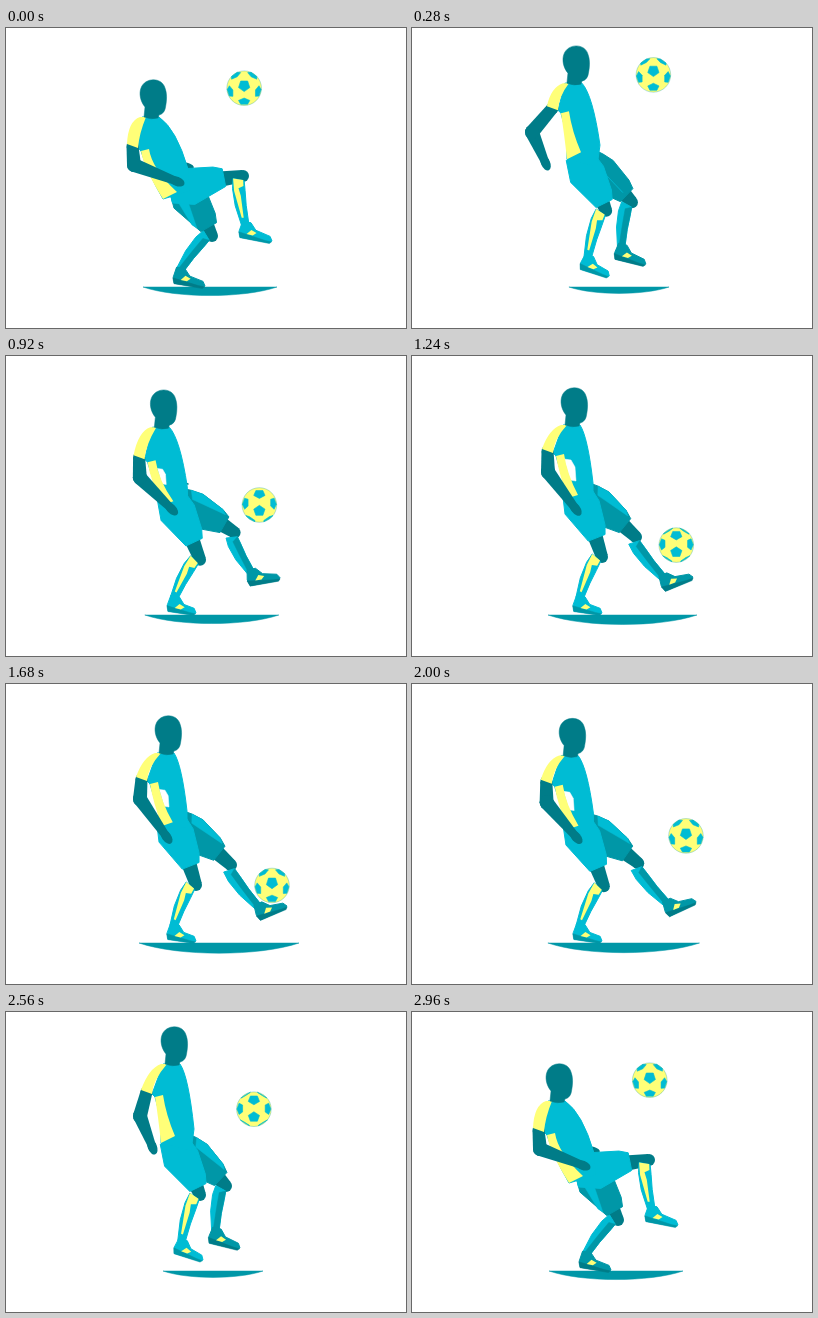
An HTML page with a canvas that plays this animation: 400 by 300 pixels, repeating every 3 s.

```html
<!DOCTYPE html>
<html lang="en">
<head>
<meta charset="utf-8">
<title>Ball juggling</title>
<style>
html, body { margin: 0; width: 100%; height: 100%; overflow: hidden; background: #fff; }
canvas { display: block; }
</style>
</head>
<body>
<canvas id="stage" width="400" height="300"></canvas>
<script>
const ctx = document.getElementById('stage').getContext('2d');
const LOOP = 3000;
const CYAN = '#00bcd4', TEAL = '#0097a7', SKIN = '#007c88', YELLOW = '#ffff78';

// Legs are knee, ankle, toe. "side" picks the lit edge of the far shorts.
const knee = {
  head: [147, 68], sleeve: [132, 120], belly: [182, 141], back: [157, 171],
  elbow: [128, 137], hand: [170, 153], hip: [172, 157],
  near: [237, 148, 239, 197, 266, 213], far: [206, 208, 173, 243, 199, 258],
  shadow: [137, 271], gap: [0], reach: [1], side: [-1]
};
const ready = {
  ...knee, head: [147.5, 67], back: [157, 169], hip: [172, 158],
  near: [205, 211, 168, 243, 190, 257], far: [240, 167, 239, 212, 270, 226],
  shadow: [141, 267], side: [1]
};
const tap = { ...ready, far: [241, 167, 241, 207, 272, 219] };
const low = {
  head: [162, 48], sleeve: [141, 97], belly: [181, 127], back: [156, 142],
  elbow: [136, 116], hand: [163, 152], hip: [169, 138],
  near: [190, 201, 167, 243, 190, 257], far: [224, 181, 251, 222, 281, 221],
  shadow: [136, 285], gap: [1], reach: [0], side: [1]
};
const tall = { ...low, head: [161, 44], far: [224, 180, 246, 220, 275, 223], shadow: [138, 275] };
const trap = {
  ...low, elbow: [134, 115], hand: [160, 152],
  far: [225, 181, 252, 223, 281, 222], shadow: [133, 293], gap: [0.8]
};
const kick = {
  ...ready, head: [147, 69], sleeve: [131, 120], belly: [184, 143], back: [156, 168],
  elbow: [125, 137], hand: [168, 156],
  far: [241, 168, 276, 205, 301, 196], shadow: [136, 299], reach: [0]
};
const swing = { ...kick, far: [242, 166, 280, 202, 305, 192], shadow: [135, 305] };
const leap = {
  head: [168, 31], sleeve: [146, 82], belly: [188, 117], back: [155, 131],
  elbow: [134, 104], hand: [146, 134], hip: [173, 133],
  near: [194, 183, 175, 230, 197, 248], far: [220, 174, 209, 219, 234, 236],
  shadow: [157, 257], gap: [0], reach: [0], side: [1]
};
const hop = { ...leap, head: [164, 34], elbow: [120, 104], hand: [133, 134], side: [0] };

const poses = [
  [0, knee], [40, knee], [290, hop], [540, ready], [660, ready], [770, tap],
  [1000, tall], [1240, low], [1470, low], [1680, trap], [1930, low],
  [2235, swing], [2290, kick], [2560, leap], [2880, knee], [3000, knee]
];

// Time, x, y and tilt of the ball at each contact and peak.
const flight = [
  [-225, 236, 125, 0.15], [190, 240, 43, 0.15], [770, 249, 204, 0.8], [1010, 256, 140, 0.7],
  [1260, 265, 198, 0.65], [1470, 266, 165, 0.4], [1690, 266, 205, 0.15], [1930, 272, 150, 0.15],
  [2250, 281, 190, 0.1], [2540, 249, 97, 0.65], [2775, 236, 125, 0.15], [3190, 240, 43, 0.15]
];

const mix = (a, b, k) => a + (b - a) * k;
const add = (p, x, y) => [p[0] + x, p[1] + y];

function span(keys, t) {
  let i = 0;
  while (i < keys.length - 2 && t >= keys[i + 1][0]) i++;
  const a = keys[i], b = keys[i + 1];
  return [a, b, (t - a[0]) / (b[0] - a[0])];
}

function poseAt(t) {
  const [a, b, k] = span(poses, t);
  const e = (1 - Math.cos(Math.PI * k)) / 2;
  const out = {};
  for (const part in a[1]) out[part] = a[1][part].map((v, i) => mix(v, b[1][part][i], e));
  return out;
}

function ballAt(t) {
  const [a, b, k] = span(flight, t);
  const e = b[2] < a[2] ? k * (2 - k) : k * k;
  return [mix(a[1], b[1], k), mix(a[2], b[2], e), mix(a[3], b[3], k)];
}

// Local axes: u runs from a to b, v lies to its side.
function axes(a, b) {
  const len = Math.hypot(b[0] - a[0], b[1] - a[1]) || 1;
  const x = (b[0] - a[0]) / len, y = (b[1] - a[1]) / len;
  const at = (u, v) => [a[0] + x * u - y * v, a[1] + y * u + x * v];
  return { len, at, map: list => list.map(p => at(...p)) };
}

function paint(path, color, line = 1) {
  ctx.fillStyle = ctx.strokeStyle = color;
  ctx.lineWidth = line;
  ctx.lineJoin = 'round';
  ctx.fill(path);
  if (line) ctx.stroke(path);
}

function poly(points, color, line) {
  const path = new Path2D();
  points.forEach(p => path.lineTo(...p));
  path.closePath();
  paint(path, color, line);
}

function oval(c, rx, ry, color, turn = 0) {
  const path = new Path2D();
  path.ellipse(c[0], c[1], rx, ry, turn, 0, Math.PI * 2);
  paint(path, color, 0);
}

function limb(a, b, ra, rb, color) {
  const f = axes(a, b);
  poly(f.map([[0, ra], [f.len, rb], [f.len, -rb], [0, -ra]]), color, 0);
  oval(a, ra, ra, color);
  oval(b, rb, rb, color);
}

function leg(hip, joints, isNear, side) {
  const k = joints.slice(0, 2), ankle = joints.slice(2, 4), toe = joints.slice(4);
  const thigh = axes(hip, k), shin = axes(k, ankle), foot = axes(ankle, toe);
  const s = shin.len, f = foot.len;

  limb(thigh.at(38, 0), k, 8, 6, SKIN);
  poly(shin.map([[2, 10], [s * 0.25, 11], [s * 0.6, 9], [s, 3.5], [s, -4], [s * 0.6, -2], [s * 0.3, -1.5], [5, -1]]), CYAN);
  if (isNear) poly(shin.map([[2, 10], [s * 0.3, 9.5], [s * 0.85, 3], [s * 0.85, 1], [s * 0.4, 3], [12, 5], [10, 0], [4, 0]]), YELLOW, 0);
  else poly(shin.map([[5, -1], [s * 0.3, -1.5], [s * 0.6, -2], [s, -4], [s, 2], [s * 0.5, 4], [8, 5]]), TEAL, 0.5);

  poly(foot.map([[-4, -2], [-2, 8], [2, 13], [f - 2, 3], [f, 0], [f - 4, -3], [12, -1], [4, -5]]), isNear ? CYAN : TEAL);
  poly(foot.map([[-2, 9], [2, 13.5], [f - 1, 3.5], [f, 1], [f - 6, 3]]), isNear ? TEAL : SKIN, 0.5);
  poly(foot.map([[8, 1], [14, 1], [12, 5], [6, 7]]), YELLOW, 0);

  poly(thigh.map([[-8, 17], [14, 21.5], [47, 8], [46, -10], [37, -13], [12, -15], [0, -12], [-10, -8]]), isNear ? CYAN : TEAL);
  if (!isNear) poly(thigh.map([[0, -12 * side], [12, -15 * side], [37, -13 * side], [42, -10 * side], [6, -5 * side]]), CYAN, 0.5);
}

function torso(p) {
  const nape = add(p.head, -11, 21), throat = add(p.head, 6, 21);
  const chest = add(throat, (p.belly[0] - throat[0]) * 0.6, 12);
  const pit = add(p.sleeve, 3, 3), cuff = add(p.sleeve, -11, -4);
  const shirt = new Path2D();
  shirt.moveTo(...nape);
  shirt.lineTo(...throat);
  shirt.quadraticCurveTo(...chest, ...p.belly);
  shirt.lineTo(...add(p.hip, 12, 6));
  shirt.lineTo(...p.back);
  shirt.quadraticCurveTo(...add(pit, 7, 22), ...pit);
  shirt.lineTo(...p.sleeve);
  shirt.closePath();
  paint(shirt, CYAN);

  const g = p.gap[0];
  if (g > 0.05) {
    const c = add(pit, 15, 15);
    const hole = [[-7, -12], [0, -11], [4, -4], [5, 10], [-1, 9]];
    poly(hole.map(([x, y]) => add(c, x * g, y * g)), '#fff', 0.5);
  }

  const panel = new Path2D();
  const end = add(p.back, mix(14, 10, g), mix(-7, -3, g));
  panel.moveTo(...pit);
  panel.lineTo(...add(pit, 8, -2));
  panel.quadraticCurveTo(...add(pit, 11, 18), ...end);
  panel.lineTo(...p.back);
  panel.quadraticCurveTo(...add(pit, 3, 18), ...pit);
  paint(panel, YELLOW, 0);

  const arm = [(cuff[0] + p.sleeve[0]) / 2, (cuff[1] + p.sleeve[1]) / 2];
  limb(arm, p.elbow, 6, 7, SKIN);
  limb(p.elbow, p.hand, 7, 4, SKIN);
  const wrist = axes(p.elbow, p.hand);
  const turn = Math.atan2(p.hand[1] - p.elbow[1], p.hand[0] - p.elbow[0]);
  oval(wrist.at(wrist.len + 1, 0), 8, 4.6, SKIN, turn);

  const stripe = new Path2D();
  stripe.moveTo(...add(nape, 4, 0));
  stripe.lineTo(...add(nape, -2, 0));
  stripe.quadraticCurveTo(...add(nape, -14, 4), ...cuff);
  stripe.lineTo(...p.sleeve);
  stripe.quadraticCurveTo(...add(p.sleeve, 1, -14), ...add(nape, 4, 0));
  paint(stripe, YELLOW, 0);
}

function head([x, y]) {
  ctx.save();
  ctx.translate(x, y);
  paint(new Path2D('M-9 21L-8 11C-13 5-14-3-12-8C-8-19 9-19 12-8C14-3 14 4 12.5 11C12 15 10 18 6 19L5 22Q-2 24-9 21Z'), SKIN, 0.5);
  ctx.restore();
}

// One pentagon patch on the sphere, given by its polar angle and azimuth.
function patch(polar, around, tilt, radius) {
  const sp = Math.sin(polar), cp = Math.cos(polar);
  const sa = Math.sin(around), ca = Math.cos(around);
  const st = Math.sin(tilt), ct = Math.cos(tilt);
  if (sp * sa * st + cp * ct < -0.15) return;
  const size = 0.35;
  const corners = [0, 1, 2, 3, 4].map(i => {
    const a = i * Math.PI * 0.4;
    const u = Math.cos(a) * Math.sin(size), v = Math.sin(a) * Math.sin(size), w = Math.cos(size);
    const x = sp * ca * w - cp * ca * u - sa * v;
    const y = sp * sa * w - cp * sa * u + ca * v;
    const z = cp * w + sp * u;
    return [x * radius, (y * ct - z * st) * radius];
  });
  poly(corners, CYAN, 0.6);
}

function ball([x, y, tilt]) {
  const radius = 17.3;
  ctx.save();
  ctx.translate(x, y);
  oval([0, 0], radius, radius, YELLOW);
  patch(0, -Math.PI / 2, tilt, radius);
  for (let i = 0; i < 5; i++) {
    const a = Math.PI / 2 + i * Math.PI * 0.4;
    patch(1.107, a, tilt, radius);
    patch(2.034, a + Math.PI / 5, tilt, radius);
  }
  ctx.strokeStyle = 'rgba(0,151,167,.5)';
  ctx.lineWidth = 0.6;
  ctx.beginPath();
  ctx.arc(0, 0, radius, 0, Math.PI * 2);
  ctx.stroke();
  ctx.restore();
}

function shadow([l, r]) {
  const w = r - l, y = 259 + w * 0.085;
  const path = new Path2D();
  path.moveTo(l, 259);
  path.bezierCurveTo(l + w * 0.25, y, r - w * 0.25, y, r, 259);
  path.closePath();
  paint(path, TEAL, 0.5);
}

function draw(t) {
  const p = poseAt(t);
  ctx.fillStyle = '#fff';
  ctx.fillRect(0, 0, 400, 300);
  shadow(p.shadow);
  if (p.reach[0] > 0.05) oval(add(p.belly, 0, -3), 6 * p.reach[0], 3 * p.reach[0], SKIN, 0.3);
  leg(add(p.hip, 9, 1), p.far, false, p.side[0]);
  leg(p.hip, p.near, true);
  torso(p);
  head(p.head);
  ball(ballAt(t));
}

const start = performance.now();
function tick() {
  const t = (performance.now() - start) % LOOP;
  draw(Math.floor(t / 40) * 40);
  requestAnimationFrame(tick);
}
tick();
</script>
</body>
</html>
```
